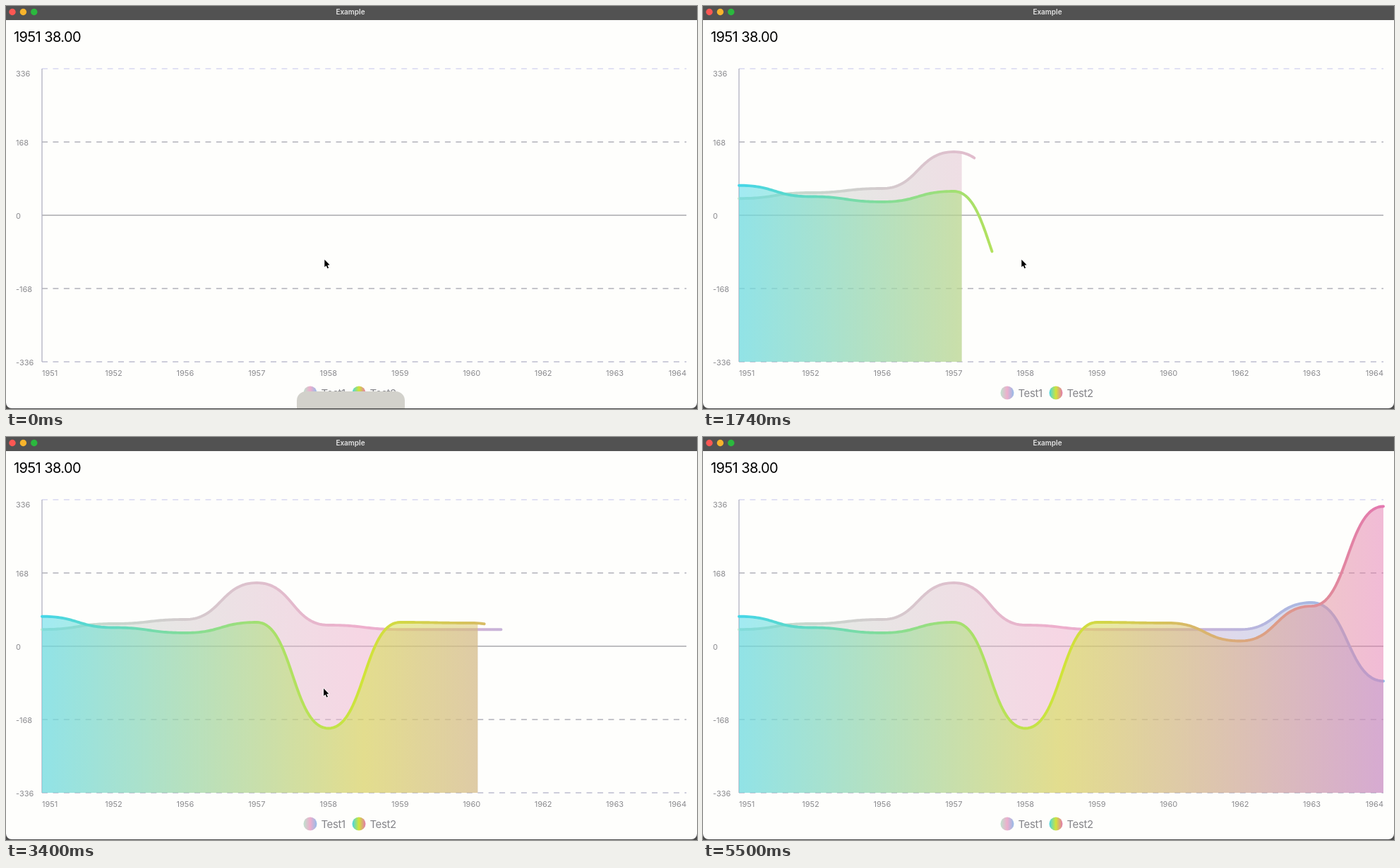
Write an HTML page with a canvas that moves like this. It is 979x572 px and loops after 5.53 s.

```html
<!DOCTYPE html>
<html lang="en">
<head>
<meta charset="utf-8">
<title>Example</title>
<style>
html, body { margin: 0; width: 100%; height: 100%; overflow: hidden; background: #fefefc; }
canvas { display: block; width: 979px; height: 572px; }
</style>
</head>
<body>
<canvas id="stage" width="979" height="572"></canvas>
<script>
const ctx = document.getElementById('stage').getContext('2d');
const W = 979, H = 572, LOOP = 5530;
const LEFT = 51, RIGHT = 964, TOP = 89, BOTTOM = 505, ZERO = 297;
const STEP = (RIGHT - LEFT) / 9;
const YEARS = [1951, 1952, 1956, 1957, 1958, 1959, 1960, 1962, 1963, 1964];
const FONT = 'Inter, "Liberation Sans", sans-serif';

const clamp = v => Math.max(0, Math.min(1, v));
const smooth = v => { v = clamp(v); return v * v * (3 - 2 * v); };
const mix = (a, b, v) => a + (b - a) * v;

// Horizontal-tangent curves through the data, sampled with running length.
function trace(ys) {
  const pts = [{ x: LEFT, y: ys[0], len: 0 }];
  for (let i = 0; i < ys.length - 1; i++) {
    for (let j = 1; j <= 40; j++) {
      const t = j / 40, last = pts[pts.length - 1];
      const x = LEFT + STEP * (i + 1.5 * t * (1 - t) + t ** 3);
      const y = mix(ys[i], ys[i + 1], smooth(t));
      pts.push({ x, y, len: last.len + Math.hypot(x - last.x, y - last.y) });
    }
  }
  return pts;
}

const series = [
  { name: 'Test1', cx: 431, colors: ['rgb(190,226,206)', 'rgb(238,174,204)', 'rgb(148,187,233)'],
    pts: trace([273.2, 265, 259, 207, 267, 273.2, 273.2, 273.2, 235, 346.5]) },
  { name: 'Test2', cx: 500, colors: ['rgb(69,214,232)', 'rgb(208,228,56)', 'rgb(228,120,176)'],
    pts: trace([254.7, 270.5, 278, 263, 413.5, 263, 264, 289.5, 240, 98.5]) }
];

function gradient(colors, x0, x1) {
  const g = ctx.createLinearGradient(x0, 0, x1, 0);
  colors.forEach((c, i) => g.addColorStop(i / 2, c));
  return g;
}

function text(str, x, y, size, color, align = 'left', weight = 400, spacing = 0) {
  ctx.font = `${weight} ${size}px ${FONT}`;
  ctx.letterSpacing = spacing + 'px';
  ctx.textAlign = align;
  ctx.fillStyle = color;
  ctx.fillText(str, x, y);
}

function line(x0, y0, x1, y1, color, width, dash = []) {
  ctx.beginPath();
  ctx.moveTo(x0, y0);
  ctx.lineTo(x1, y1);
  ctx.strokeStyle = color;
  ctx.lineWidth = width;
  ctx.lineCap = 'butt';
  ctx.setLineDash(dash);
  ctx.stroke();
  ctx.setLineDash([]);
}

function disc(x, y, r, fill) {
  ctx.beginPath();
  ctx.arc(x, y, r, 0, Math.PI * 2);
  ctx.fillStyle = fill;
  ctx.fill();
}

function drawWindow() {
  ctx.fillStyle = '#fefefc';
  ctx.fillRect(0, 0, W, H);
  ctx.fillStyle = '#525252';
  ctx.fillRect(0, 0, W, 20);
  ['#fc5753', '#f8b42c', '#2bb93e'].forEach((c, i) => disc(9 + 15.4 * i, 8.5, 4.7, c));
  text('Example', 488, 11.5, 10, '#e4e4e4', 'center', 600);
  text('1951 38.00', 11, 51, 20, '#000', 'left', 400, -0.6);
}

function drawGrid() {
  const dash = [8, 7.43], gray = '#8a8a8e';
  line(LEFT, TOP, RIGHT, TOP, '#d8d8f1', 1.3, dash);
  line(LEFT, 193, RIGHT, 193, '#b1b1ba', 1.5, dash);
  line(LEFT, 401, RIGHT, 401, '#b1b1ba', 1.5, dash);
  line(LEFT, BOTTOM, RIGHT, BOTTOM, '#bdbdd0', 1.4, dash);
  line(LEFT, ZERO, RIGHT, ZERO, '#a9a9ae', 1.5);
  line(LEFT, TOP, LEFT, BOTTOM, '#b0b0c2', 1.3);
  [336, 168, 0, -168, -336].forEach((v, i) => text(v, 14, i ? 93.5 + 104 * i : 100, 11, gray));
  YEARS.forEach((year, i) => {
    const align = i === 0 ? 'left' : i === 9 ? 'right' : 'center';
    text(year, LEFT + STEP * i, 525, 11, gray, align);
  });
}

function drawSeries({ pts, colors }, p) {
  const paint = gradient(colors, LEFT, RIGHT);
  ctx.save();
  ctx.beginPath();
  ctx.rect(LEFT, 0, (RIGHT - LEFT) * p, H);
  ctx.clip();
  ctx.beginPath();
  ctx.moveTo(LEFT, BOTTOM);
  pts.forEach(q => ctx.lineTo(q.x, q.y));
  ctx.lineTo(RIGHT, BOTTOM);
  ctx.globalAlpha = 0.5;
  ctx.fillStyle = paint;
  ctx.fill();
  ctx.restore();

  const end = pts[pts.length - 1].len * p;
  ctx.beginPath();
  ctx.moveTo(pts[0].x, pts[0].y);
  for (let i = 1; i < pts.length; i++) {
    const a = pts[i - 1], b = pts[i];
    const v = clamp((end - a.len) / (b.len - a.len));
    ctx.lineTo(mix(a.x, b.x, v), mix(a.y, b.y, v));
    if (v < 1) break;
  }
  ctx.strokeStyle = paint;
  ctx.lineWidth = 3.9;
  ctx.lineCap = ctx.lineJoin = 'round';
  ctx.stroke();
}

function drawLegend() {
  for (const { name, cx, colors } of series) {
    disc(cx, 549, 9.5, gradient(colors, cx - 9.5, cx + 9.5));
    text(name, cx + 15.5, 555, 15, '#85858a', 'left', 400, -0.4);
  }
}

// Translucent panel sliding out below the window.
function drawPanel(t) {
  const y = mix(547, 573, smooth(t / 640));
  if (y >= H) return;
  ctx.beginPath();
  ctx.roundRect(412, y, 153, 50, 13);
  ctx.fillStyle = '#d2d1cb';
  ctx.fill();
}

function drawEdge() {
  ctx.beginPath();
  ctx.rect(0, 0, W, H);
  ctx.roundRect(0, -20, W, H + 19, 8);
  ctx.fillStyle = '#4c4c4c';
  ctx.fill('evenodd');
}

function drawCursor(t) {
  let x = 451.3, y = 360;
  const nudge = smooth((t - 3250) / 150), sweep = smooth((t - 3850) / 850);
  x = mix(x - 1.2 * nudge, 733, sweep);
  y = mix(y - 3 * nudge, -7, sweep) - 20 * clamp((t - 4700) / 120);
  ctx.save();
  ctx.translate(x, y);
  ctx.beginPath();
  [[0, 0], [0, 10.6], [2.4, 8.4], [4.2, 12.5], [5.8, 11.8], [4.1, 7.8], [7.3, 7.6]]
    .forEach(([px, py]) => ctx.lineTo(px, py));
  ctx.closePath();
  ctx.strokeStyle = '#fff';
  ctx.lineWidth = 1.6;
  ctx.lineJoin = 'round';
  ctx.stroke();
  ctx.fillStyle = '#000';
  ctx.fill();
  ctx.restore();
}

function draw(now) {
  // Picture advances at 30 steps a second on a 10 ms clock.
  const step = Math.floor(Math.floor((now % LOOP) / 10) * 3 / 10);
  const t = step * 100 / 3;
  const p = step ? clamp((t + 10) / 5043) : 0;
  drawWindow();
  drawGrid();
  if (p) series.forEach(s => drawSeries(s, p));
  drawLegend();
  drawPanel(t);
  drawEdge();
  drawCursor(t);
}

const start = performance.now();
function tick() {
  draw(performance.now() - start);
  requestAnimationFrame(tick);
}
tick();
</script>
</body>
</html>
```
